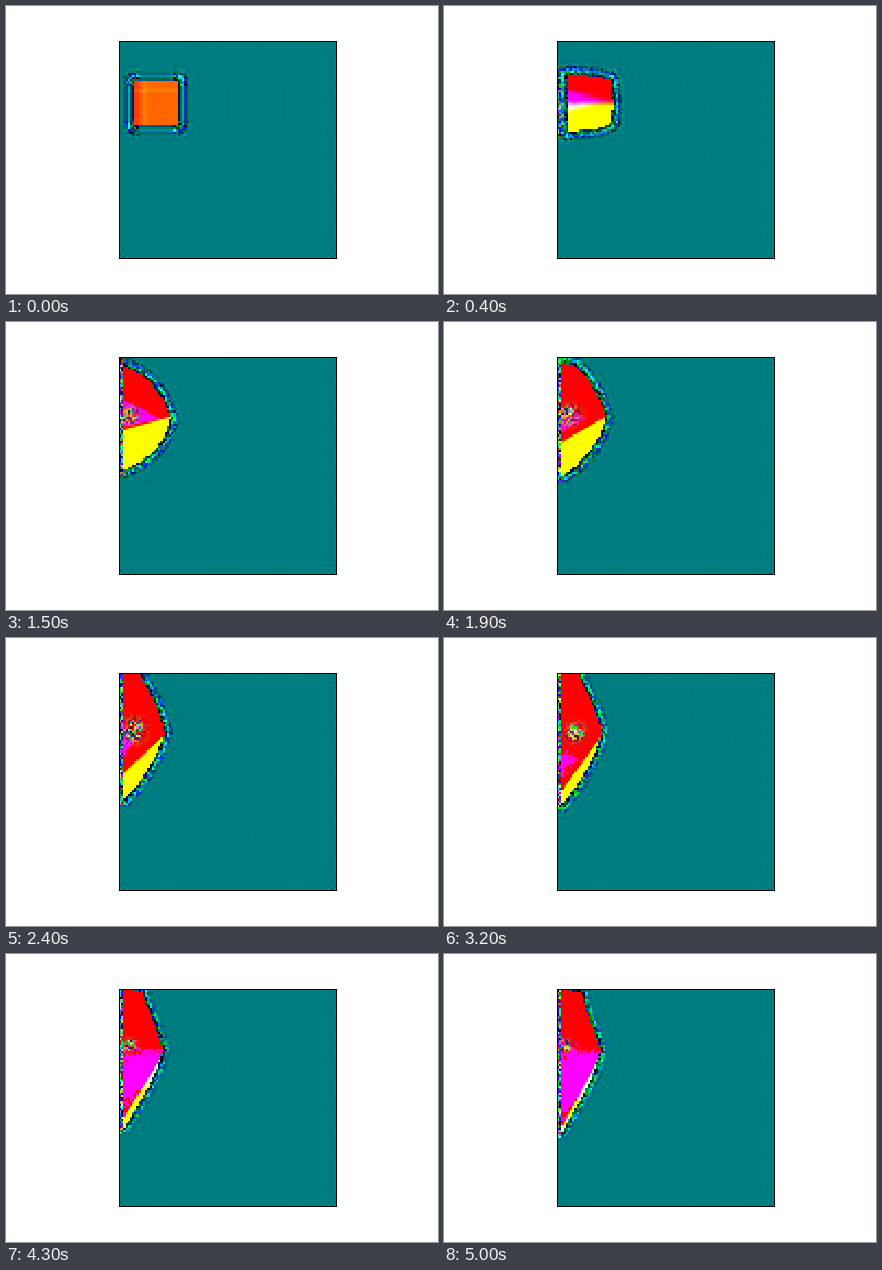
A matplotlib script for the animation above (5.1 s loop, 432x288 px).

```python
import numpy as np
import matplotlib.pyplot as plt
from matplotlib.animation import FuncAnimation
from matplotlib.path import Path

W, H, DPI = 432, 288, 72
N, FRAMES = 100, 51
LEFT, TOP, SIDE = 112.68, 34.56, 217.44
WALL = 118

# Grid cell centres in stage pixels
axis = (np.arange(N) + 0.5) * SIDE / N
X, Y = np.meshgrid(LEFT + axis, TOP + axis)
CELLS = np.column_stack([X.ravel(), Y.ravel()])

rng = np.random.default_rng(7)
PHASE = rng.uniform(0, 2 * np.pi, (4, N, N))
RATE = rng.uniform(0.15, 0.6, (4, N, N))

# Outline of the blob, clockwise from its top left corner
OUTLINE_TIMES = [0, 8, 15, 24, 50]
OUTLINES = np.array([
    [(127, 75), (142, 75), (157, 75), (172, 75), (172, 97),
     (172, 120), (157, 120), (142, 120), (127, 120)],
    [(118, 64), (133, 65), (148, 67), (160, 74), (165, 97),
     (163, 113), (155, 125), (135, 129), (118, 132)],
    [(118, 45), (130, 50), (143, 60), (155, 76), (164, 97),
     (158, 115), (147, 130), (132, 141), (118, 148)],
    [(118, 37), (132, 37), (140, 50), (151, 70), (158, 95),
     (151, 115), (141, 132), (129, 150), (118, 161)],
    [(118, 37), (137, 39), (141, 55), (149, 75), (156, 96),
     (151, 115), (141, 137), (129, 158), (118, 178)],
], float)

# Heights of the colour borders at the wall and at x = 160
TIMES = [0, 8, 15, 24, 32, 43, 50]
GREEN_EDGE = [(97, 97), (97, 97), (108, 96), (135, 95), (152, 94), (163, 95), (172, 94)]
BLUE_TOP = [(81, 91), (81, 91), (78, 99), (95, 112), (114, 130), (98, 96), (95, 97)]
BLUE_END = [(110, 98), (110, 98), (106, 96), (118, 70), (138, 90), (155, 112), (168, 118)]


def keyed(frame, times, values):
    return np.interp(frame, times, values)


def border(frame, pairs):
    a, b = (keyed(frame, TIMES, v) for v in zip(*pairs))
    return a + (b - a) * (X - WALL) / (160 - WALL)


def outline(frame):
    flat = OUTLINES.reshape(len(OUTLINES), -1)
    return np.array([keyed(frame, OUTLINE_TIMES, col) for col in flat.T]).reshape(-1, 2)


def distance(pts):
    """Pixel distance of each cell to the closed polyline."""
    best = np.full(len(CELLS), 1e9)
    for a, b in zip(pts, np.roll(pts, -1, axis=0)):
        ab = b - a
        t = np.clip((CELLS - a) @ ab / (ab @ ab), 0, 1)
        best = np.minimum(best, np.hypot(*(CELLS - a - t[:, None] * ab).T))
    return best.reshape(N, N)


def still_water():
    img = np.zeros((N, N, 3))
    img[...] = 0, 125 / 255, 128 / 255
    i, j = np.meshgrid(np.arange(N), np.arange(N))
    ripple = np.zeros((N, N))
    for ci, cj in ((N - 1, 0), (0, N - 1), (N - 1, N - 1)):
        di, dj = abs(i - ci), abs(j - cj)
        ripple += 0.13 * np.cos(2.2 * di) * np.cos(2.2 * dj) * np.exp(-(di + dj) / 4)
    ripple[:, 94] += 0.012
    ripple[:, -1] += 0.015
    ripple[-1] += 0.015
    img[..., 1] += ripple
    img[..., 2] += 0.7 * ripple
    return img


WATER = still_water()


def inner_colour(frame, noise):
    grow = min(frame / 7, 1) ** 2
    late = np.clip((frame - 20) / 25, 0, 1)
    y = Y + late * noise[3] * (3 + 9 * np.clip((140 - X) / 22, 0, 1))
    grid = (np.exp(-((X - 139) / 1.5) ** 2) + np.exp(-((Y - 85) / 1.5) ** 2)
            - 1.6 * np.exp(-((X - 130) / 2.5) ** 2))
    green = 0.4 + 0.12 * grid * (1 - grow) + grow * (Y - border(frame, GREEN_EDGE)) / 2
    blue = grow * np.minimum(y - border(frame, BLUE_TOP), border(frame, BLUE_END) - y) / 2
    rgb = np.dstack([np.ones((N, N)), green, blue])

    # Turbulent spot left of the middle
    size = keyed(frame, TIMES, [0, 0, 7, 10, 8, 6, 5])
    cx = keyed(frame, TIMES, [124, 124, 124, 127, 131, 124, 122])
    cy = keyed(frame, TIMES, [95, 95, 94, 93, 95, 92, 92])
    spot = np.exp(-(((X - cx) ** 2 + (Y - cy) ** 2) / (size ** 2 + 1e-3)))
    spot = spot[..., None] * (size > 0)
    swirl = np.dstack([0.65 + 0.6 * noise[0], 0.45 + 0.5 * noise[1], 0.25 + 0.5 * noise[2]])
    rgb = np.clip(rgb, 0, 1)
    return rgb + np.clip(1.6 * spot, 0, 1) * (swirl - rgb)


def rim_colour(frame, d, noise):
    grow = min(frame / 6, 1)
    width = keyed(frame, TIMES, [8, 8, 7, 6.5, 6, 5, 5])
    amp = 1 / (1 + (d / width) ** 6) + 0.07 * np.exp(-d / 12)
    flat_side = (abs(X - 150) < 17) * (1 - grow)
    amp *= 1 - 0.65 * flat_side
    corner = (abs(Y - 97) > 17) & (abs(X - 150) > 15)
    rough = np.where(corner, 1, grow)
    rgb = WATER.copy()
    rgb[..., 0] += amp * rough * (0.5 * noise[0] - 0.35)
    rgb[..., 1] += amp * (0.3 * np.cos(d * 0.9 + 2.6) + 0.42 * rough * noise[1] - 0.1)
    rgb[..., 2] += amp * (0.4 * np.cos(d * 0.9 + 1.4) + 0.45 * rough * noise[2])
    return rgb


def picture(frame):
    noise = np.sin(PHASE + RATE * frame)
    pts = outline(frame)
    d = distance(pts)
    inside = Path(pts).contains_points(CELLS).reshape(N, N)
    rgb = np.where(inside[..., None], inner_colour(frame, noise), rim_colour(frame, d, noise))

    # Choppy strip along the left wall
    grow = min(frame / 6, 1)
    strip = (X < WALL) & (Y > pts[0, 1] - 9) & (Y < pts[-1, 1] + 6)
    chop = np.dstack([0.15 + 0.7 * noise[0], 0.4 + 0.6 * noise[1], 0.5 + 0.7 * noise[2]])
    rgb += grow * strip[..., None] * (chop - rgb)
    return np.clip(rgb, 0, 1)


fig = plt.figure(figsize=(W / DPI, H / DPI), dpi=DPI, facecolor="white")
ax = fig.add_axes([LEFT / W, 1 - (TOP + SIDE) / H, SIDE / W, SIDE / H])
image = ax.imshow(picture(0), interpolation="nearest", aspect="auto")
ax.set_xticks([])
ax.set_yticks([])
for spine in ax.spines.values():
    spine.set_linewidth(1)


def update(frame):
    image.set_data(picture(frame))
    return [image]


anim = FuncAnimation(fig, update, frames=FRAMES, interval=100, repeat=True, repeat_delay=0)
plt.show()
```
